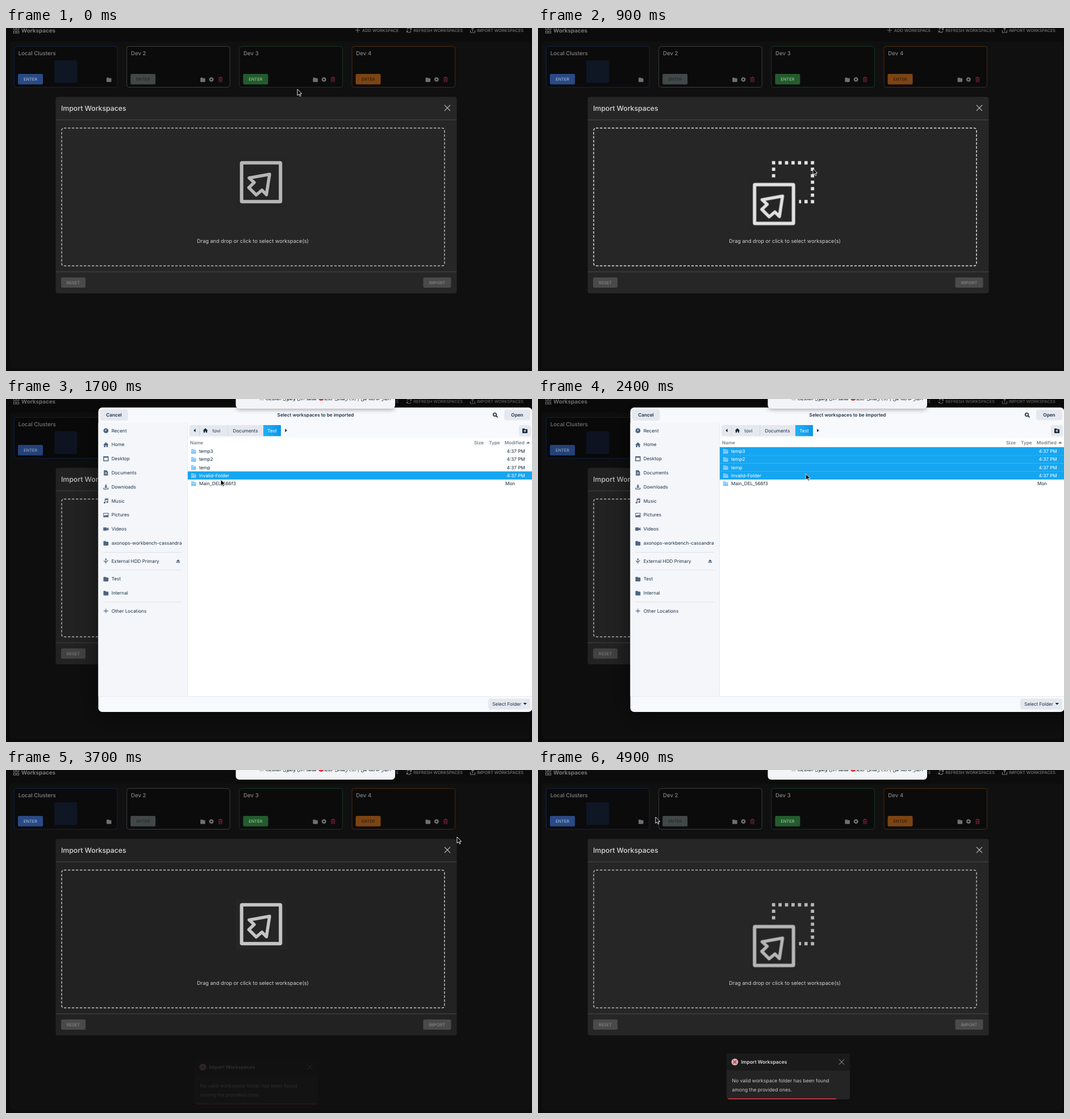
Animation of 926x605 px, one loop 5000 ms. Source, as an HTML page:

```html
<!DOCTYPE html>
<html lang="en">
<head>
<meta charset="utf-8">
<title>Import Workspaces</title>
<style>
html, body { margin: 0; width: 100%; height: 100%; overflow: hidden; background: #0c0c0d; }
svg { display: block; }
text { font-family: Inter, "Open Sans", sans-serif; text-rendering: geometricPrecision; white-space: pre; }
.caps { font-size: 7.4px; font-weight: 500; }
.card { font-size: 9.7px; font-weight: 500; fill: #858585; }
.gtk { font-size: 8.2px; fill: #1b3048; }
.bold { font-weight: 600; }
.mid { text-anchor: middle; }
.line { fill: none; stroke: currentColor; stroke-width: 1.1; }

/* One shared 5 s clock; 2% is one 100 ms tick. */
.anim { animation: 5s step-end infinite; }
#cursor { animation-name: point; transform: translate(513px, 108px); }
#zone { animation-name: glow; color: #b6b6b6; }
#box { animation-name: slide; }
#modal { animation-name: shade; fill: #262626; }
#dialog { animation-name: dialog; visibility: hidden; }
#cols { animation-name: cols; }
#strip { animation-name: strip; visibility: hidden; }
#open { animation-name: press; fill: #e5e8ee; stroke: none; }
#note { animation-name: drop; transform: translateY(-40px); }
#toast { animation-name: toast; opacity: 0; }
#bar { animation-name: bar; }
.pick { opacity: 0; }
.one { animation-name: one; }
.all { animation-name: all; }
.brief { animation-name: brief; }

@keyframes point {
  4% { transform: translate(513px, 108px); animation-timing-function: steps(6, start); }
  16% { transform: translate(484px, 248px); }
  20% { transform: translate(515px, 162px); }
  22% { transform: translate(515px, 162px); animation-timing-function: steps(4, start); }
  30% { transform: translate(378px, 142px); }
  42% { transform: translate(378px, 142px); animation-timing-function: steps(2, start); }
  46% { transform: translate(385px, 147px); }
  48% { transform: translate(385px, 147px); animation-timing-function: steps(6, start); }
  60% { transform: translate(903px, 57px); animation-timing-function: steps(2, start); }
  64% { transform: translate(900px, 27px); animation-timing-function: steps(4, start); }
  72% { transform: translate(797px, 117px); }
  74% { transform: translate(794px, 118px); }
  84% { transform: translate(784px, 140px); }
  98% { transform: translate(207px, 83px); }
}
@keyframes glow {
  6% { color: #b6b6b6; animation-timing-function: steps(4, start); }
  14% { color: #e2e2e2; }
  28% { color: #e2e2e2; animation-timing-function: steps(4, start); }
  36%, 72% { color: #c5c5c5; }
  84% { color: #b6b6b6; }
}
@keyframes slide {
  8% { transform: none; animation-timing-function: steps(4, start); }
  16% { transform: translate(-33.5px, 38.5px); }
  74% { transform: none; }
  98% { transform: translate(-33.5px, 38.5px); }
}
@keyframes shade { 74% { fill: #222; } 84% { fill: #262626; } }
@keyframes dialog { 20% { visibility: visible; } 74% { visibility: hidden; } }
@keyframes cols { 20% { transform: translateX(-17.5px); } 22% { transform: none; } }
@keyframes strip { 20% { visibility: visible; } 22% { visibility: hidden; } }
@keyframes press { 62% { fill: #d3d9e2; stroke: #aeb9c7; } 74% { fill: #e5e8ee; stroke: none; } }
@keyframes one { 28% { opacity: 1; } 74% { opacity: 0; } }
@keyframes all { 38% { opacity: 1; } 74% { opacity: 0; } }
@keyframes brief { 38% { opacity: 1; } 48% { opacity: 0; } }
@keyframes drop {
  28% { transform: translateY(-22px); animation-timing-function: steps(4, start); }
  36%, 100% { transform: none; }
}
@keyframes toast {
  74% { opacity: .15; transform: translateY(9px); }
  84%, 100% { opacity: 1; transform: none; }
}
@keyframes bar { 74% { width: 213px; } 84% { width: 204px; } 98% { width: 190px; } }
</style>
</head>
<body>
<svg width="926" height="605" viewBox="0 0 926 605">
  <defs>
    <filter id="blur" x="-30%" y="-30%" width="160%" height="160%"><feGaussianBlur stdDeviation="20"/></filter>
    <filter id="soft" x="-10%" y="-60%" width="120%" height="220%"><feGaussianBlur stdDeviation="4"/></filter>
    <linearGradient id="blue" x2="1"><stop stop-color="#23b0f5"/><stop offset="1" stop-color="#0b97e8"/></linearGradient>
    <!-- icons in a 10 by 10 box -->
    <path id="folder" d="M.5 2q0-1 1-1h2.7l1.2 1.2h3.1q1 0 1 1v5q0 1-1 1h-7q-1 0-1-1z" fill="currentColor"/>
    <path id="dir" d="M.5 2q0-1 1-1h2.7l1.2 1.2h3.1q1 0 1 1v.5H.5zM.5 4.4h9v3.8q0 1-1 1h-7q-1 0-1-1z" fill="currentColor"/>
    <g id="gear"><circle class="line" cx="5" cy="5" r="2.7" style="stroke-width:2.2"/><circle class="line" cx="5" cy="5" r="3.9" stroke-dasharray="1.5 1.56"/></g>
    <path id="trash" class="line" d="M1 2.2h8M3.7 2V.9h2.6V2M2 2.4l.5 6.8h5L8 2.4M4 4v3.6M6 4v3.6"/>
    <path id="plus" class="line" d="M5 1v8M1 5h8"/>
    <path id="cross" class="line" d="M0 0l10 10M10 0L0 10"/>
    <g id="clock"><circle cx="5" cy="5" r="4.5" fill="currentColor"/><path d="M5 2.2V5H3" fill="none" stroke="#f4f6fa"/></g>
    <path id="home" d="M5 .5L.2 5h1.3v4.3h2.6V6.4h1.8v2.9h2.6V5h1.3z" fill="currentColor"/>
    <path id="desk" class="line" d="M1 1.3h8v7.4H1zM1 2.2h8" style="stroke-width:1.5"/>
    <path id="doc" d="M1.3.3h4.8L8.7 3v6.7H1.3zM3 4.2v.9h4v-.9zM3 6.3v.9h4v-.9z" fill="currentColor" fill-rule="evenodd"/>
    <path id="down" d="M4 .5h2v3.8h2L5 7.4 2 4.3h2zM.5 6.5h1.4v1.6h6.2V6.5h1.4v3h-9z" fill="currentColor"/>
    <path id="music" d="M3 .8l6-.6v6.9a1.6 1.4 0 1 1-1.2-1.4V2.7l-3.6.4v5a1.6 1.4 0 1 1-1.2-1.4z" fill="currentColor"/>
    <path id="pic" d="M.3 1.2h9.4v7.6H.3zM1.4 2.3v4.6l2-2 1.5 1.4 2-2.3 1.7 2V2.3z" fill="currentColor" fill-rule="evenodd"/>
    <path id="video" d="M.3 2h6.2v2L9.7 2v6L6.5 6v2H.3z" fill="currentColor"/>
    <path id="usb" class="line" d="M5 9.6V1M3.7 2.2L5 .6l1.3 1.6M5 7.5L2 5.7V3.6M5 6.5l3-1.5V3"/>
  </defs>

  <rect width="926" height="605" fill="#0c0c0d"/>
  <rect x="7" y="24" width="916" height="576" rx="5" fill="#101011"/>
  <g color="#777" fill="#777">
    <path class="line" d="M13.5-1h3.6v3.8h-3.6zM19-1h3.6v3.8H19zM13.5 5.2h3.6V9h-3.6zM19 5.2h3.6V9H19z"/>
    <text x="27" y="7.6" font-size="9.8" font-weight="700">Workspaces</text>
    <use href="#plus" x="614" y="-1"/>
    <text class="caps" x="627" y="6.8">ADD WORKSPACE</text>
    <path class="line" d="M706 3a3.8 3.8 0 0 1 7-1M713.500 0v2.600h-2.600M713 5a3.800 3.800 0 0 1-7 1M705.500 8V5.400h2.600"/>
    <text class="caps" x="717.500" y="6.800">REFRESH WORKSPACES</text>
    <path class="line" d="M817.500 4v4h8V4M821.500 6V0M819.300 2l2.200-2.200L823.700 2"/>
    <text class="caps" x="829" y="6.800">IMPORT WORKSPACES</text>
  </g>
  <g id="cards"></g>

  <rect id="modal" class="anim" x="87.500" y="121.500" width="706" height="346.500" rx="4"/>
  <path d="M87.500 162h706M87.500 430h706" stroke="#484848"/>
  <text x="97" y="145.600" font-size="12.250" font-weight="500" fill="#dcdcdc">Import Workspaces</text>
  <use href="#cross" x="772" y="136" color="#b5b5b5"/>
  <g id="zone" class="anim">
    <rect class="line" x="98" y="176.500" width="674" height="243" rx="4" stroke-dasharray="4.300 2.700" style="stroke-width:1.500"/>
    <rect class="line" x="414.750" y="237.750" width="68.500" height="68.500" stroke-dasharray="5.700 5.717" stroke-dashoffset="2.850" style="stroke-width:5.800"/>
    <g id="box" class="anim">
      <rect x="405" y="228" width="88" height="88" fill="#252525"/>
      <rect class="line" x="414.750" y="237.750" width="68.500" height="68.500" rx="1" style="stroke-width:6"/>
      <path class="line" d="M464 258l-36 6.500 9 8-9.500 9 13 13 10-8.500 8 8z" stroke-linejoin="round" style="stroke-width:5.500"/>
    </g>
  </g>
  <text class="mid" x="434.500" y="378.700" font-size="9.150" fill="#d2d2d2">Drag and drop or click to select workspace(s)</text>
  <rect x="97" y="440" width="43" height="18" rx="2" fill="#4a4a4a"/>
  <rect x="734.500" y="440" width="49" height="18" rx="2" fill="#4a4a4a"/>
  <text class="caps mid" x="118.500" y="451.800" fill="#858585">RESET</text>
  <text class="caps mid" x="759" y="451.800" fill="#858585">IMPORT</text>

  <g id="toast" class="anim">
    <rect x="332" y="500" width="217" height="81" rx="4" fill="#242425"/>
    <path d="M332 530v-26q0-4 4-4h209q4 0 4 4v26z" fill="#1a1a1b"/>
    <circle cx="346.500" cy="515" r="6" fill="#d3b4b4"/>
    <path d="M343.700 512.200l5.600 5.600m0-5.600l-5.600 5.600" stroke="#c4303f" stroke-width="1.600"/>
    <text class="bold" x="357.500" y="518.200" font-size="8.560" fill="#dcdcdc">Import Workspaces</text>
    <use href="#cross" transform="translate(530 510.500) scale(.9)" color="#b0b0b0"/>
    <g font-size="8.560" fill="#c9c9c9">
      <text x="341.500" y="551">No valid workspace folder has been found</text>
      <text x="341.500" y="566.500">among the provided ones.</text>
    </g>
    <rect id="bar" class="anim" x="335" y="579" width="190" height="2" fill="#b8323f"/>
  </g>

  <g id="dialog" class="anim">
    <rect width="926" height="605" opacity=".1"/>
    <rect x="162" y="20" width="790" height="537" opacity=".5" filter="url(#blur)"/>
    <rect x="162.500" y="15" width="764" height="537" rx="7" fill="#f8f9fc"/>
    <path d="M162.500 42H320v482H162.500z" fill="#f4f6fa"/>
    <path d="M320 69h606v455H320z" fill="#fff"/>
    <path d="M162.500 524.500H926M319.500 42v482" stroke="#e6eaf0"/>
    <rect id="strip" class="anim" x="911" y="69" width="15" height="455" fill="#f4f6fa"/>
    <g fill="#e5e8ee">
      <rect x="166" y="18.500" width="48.500" height="19.500" rx="4"/>
      <path d="M327 46h126v19.500H327q-4 0-4-4V50q0-4 4-4z"/>
      <rect x="903" y="46" width="21" height="20" rx="4"/>
      <rect x="849" y="528.500" width="74" height="19" rx="4"/>
    </g>
    <rect id="open" class="anim" x="877" y="19" width="46" height="18.500" rx="4"/>
    <path d="M453 46h31v19.500h-31z" fill="url(#blue)"/>
    <path d="M340.500 46v19.500M390.500 46v19.500" stroke="#d3d9e2"/>
    <g class="gtk mid">
      <text class="bold" x="190" y="31.400">Cancel</text>
      <text class="bold" x="545" y="31.400">Select workspaces to be imported</text>
      <text class="bold" x="900" y="31.400">Open</text>
      <text x="370.500" y="58.600">tovi</text>
      <text x="421.500" y="58.600">Documents</text>
      <text x="468.500" y="58.600" fill="#fff">Test</text>
      <text x="881.500" y="541">Select Folder</text>
    </g>
    <g color="#10263d" fill="#10263d">
      <circle class="line" cx="860.500" cy="27.500" r="2.800" style="stroke-width:1.500"/>
      <path class="line" d="M862.500 29.500l3 3" style="stroke-width:1.700"/>
      <path d="M333.700 52.500v6l-3.500-3zM491.300 52.500v6l3.500-3zM910.500 536h6.500l-3.250 3.500z"/>
      <use href="#home" transform="translate(346.500 51) scale(.9)"/>
      <use href="#folder" x="908.500" y="51"/>
      <path d="M913.500 54v4.500M911.200 56.200h4.600" stroke="#fff"/>
    </g>
    <g id="places" color="#4d6580"></g>
    <path d="M171 270.500h138.500M171 301.500h138.500M171 358h138.500" stroke="#dde2ea"/>
    <path d="M303 283l3.300 3.500h-6.600zM299.700 287.500h6.600v1.300h-6.600z" fill="#3f566f"/>
    <g id="rows"></g>
  </g>

  <g id="note" class="anim">
    <rect x="405" y="-20" width="280" height="38" rx="6" opacity=".4" filter="url(#soft)"/>
    <rect x="404.500" y="-25" width="280.500" height="42" rx="6" fill="#f3f4f7"/>
    <g font-size="8.500" fill="#2b3440" direction="rtl">
      <text x="678" y="2" style="font-family:'DejaVu Sans',sans-serif">أخبار عاجلة من | (3) رسائل جديدة</text>
      <text x="547" y="2" style="font-family:'DejaVu Sans',sans-serif">شاهد الآن وصول التحديث ...</text>
    </g>
    <circle cx="554.500" cy="-1.500" r="4.500" fill="#e0303a"/>
  </g>

  <path id="cursor" class="anim" d="M0 0v11l2.600-2.400 1.800 3.900 1.700-.8L4.400 8H7.800z" fill="#000" stroke="#fff" stroke-width=".9"/>
</svg>
<script>
const fill = (id, list, draw) => document.getElementById(id).innerHTML = list.map(draw).join("");
const icon = (name, x, y, color, k = 1) =>
  `<use href="#${name}" transform="translate(${x} ${y}) scale(${k})"${color ? ` color="${color}"` : ""}/>`;

fill("cards", [
  ["Local Clusters", "#14233f", "#294a86", "#a3b2cc"],
  ["Dev 2", "#3b3e3d", "#424848", "#222727"],
  ["Dev 3", "#173820", "#235c2c", "#a0b8a2"],
  ["Dev 4", "#4b2b10", "#7d4413", "#352008"],
], ([name, edge, button, ink], i) => {
  const x = 14.5 + i * 198.2;
  const tools = i
    ? icon("folder", x + 129, 86.5, "#707070", .95) + icon("gear", x + 144, 86, "#757575", .95) + icon("trash", x + 160, 86, "#7d2138", .95)
    : icon("folder", x + 162, 86.5, "#707070", .95) + `<rect x="85" y="57" width="40" height="40" rx="2" fill="#0f1624"/>`;
  return `<rect x="${x}" y="32.5" width="181.500" height="72" rx="4" fill="#0b0b0c" stroke="${edge}"/>${tools}
    <text class="card" x="${x + 7.2}" y="47.500">${name}</text>
    <rect x="${x + 6.500}" y="81" width="44" height="18.500" rx="2" fill="${button}"/>
    <text class="caps mid" x="${x + 28.500}" y="93" fill="${ink}">ENTER</text>`;
});

fill("places", [
  ["clock", "Recent", 55.5], ["home", "Home", 80.3], ["desk", "Desktop", 105], ["doc", "Documents", 130],
  ["down", "Downloads", 154.7], ["music", "Music", 179.5], ["pic", "Pictures", 204.3], ["video", "Videos", 229],
  ["folder", "axonops-workbench-cassandra", 254], ["usb", "External HDD Primary", 285.5],
  ["folder", "Test", 317.2], ["folder", "Internal", 342], ["plus", "Other Locations", 373.5],
], ([shape, name, y]) => icon(shape, 171, y - 4.5, "", .98) + `<text class="gtk" x="185.700" y="${y + 3}">${name}</text>`);

const rows = [
  ["temp3", "4:37 PM", "all"], ["temp2", "4:37 PM", "all"], ["temp", "4:37 PM", "all"],
  ["Invalid-Folder", "4:37 PM", "one"], ["Main_DEL_566f3", "Mon", "brief"],
];
const rowY = i => 92 + i * 14.25;
const label = (name, i, ink) =>
  icon("dir", 325.3, rowY(i) - 4.8, "#83c9f6") + `<text class="gtk" x="340" y="${rowY(i) + 3}" style="fill:${ink}">${name}</text>`;
const when = (time, i, ink) =>
  `<text class="gtk" x="${time === "Mon" ? 879 : 881.5}" y="${rowY(i) + 3}" style="fill:${ink}">${time}</text>`;
const dark = "#14283e";
const heads = [["Name", 324], ["Size", 824.3], ["Type", 850], ["Modified", 877.7]].map(([name, x]) =>
  `<text class="gtk bold" x="${x}" y="79.500" style="fill:#75808d">${name}</text>`);

document.getElementById("rows").innerHTML =
  heads[0] + rows.map(([name], i) => label(name, i, dark)).join("") +
  `<g id="cols" class="anim">${heads.slice(1).join("")}<path d="M916 78.500h6.500l-3.250-3.500z" fill="#66717e"/>
    ${rows.map(([, time], i) => when(time, i, dark)).join("")}</g>` +
  rows.map(([name, time, pick], i) => `<g class="anim pick ${pick}">
    <rect x="320" y="${rowY(i) - 7.1}" width="606" height="14.400" fill="#16a6f1"/>
    ${label(name, i, "#fff")}${when(time, i, "#fff")}</g>`).join("");
</script>
</body>
</html>
```
